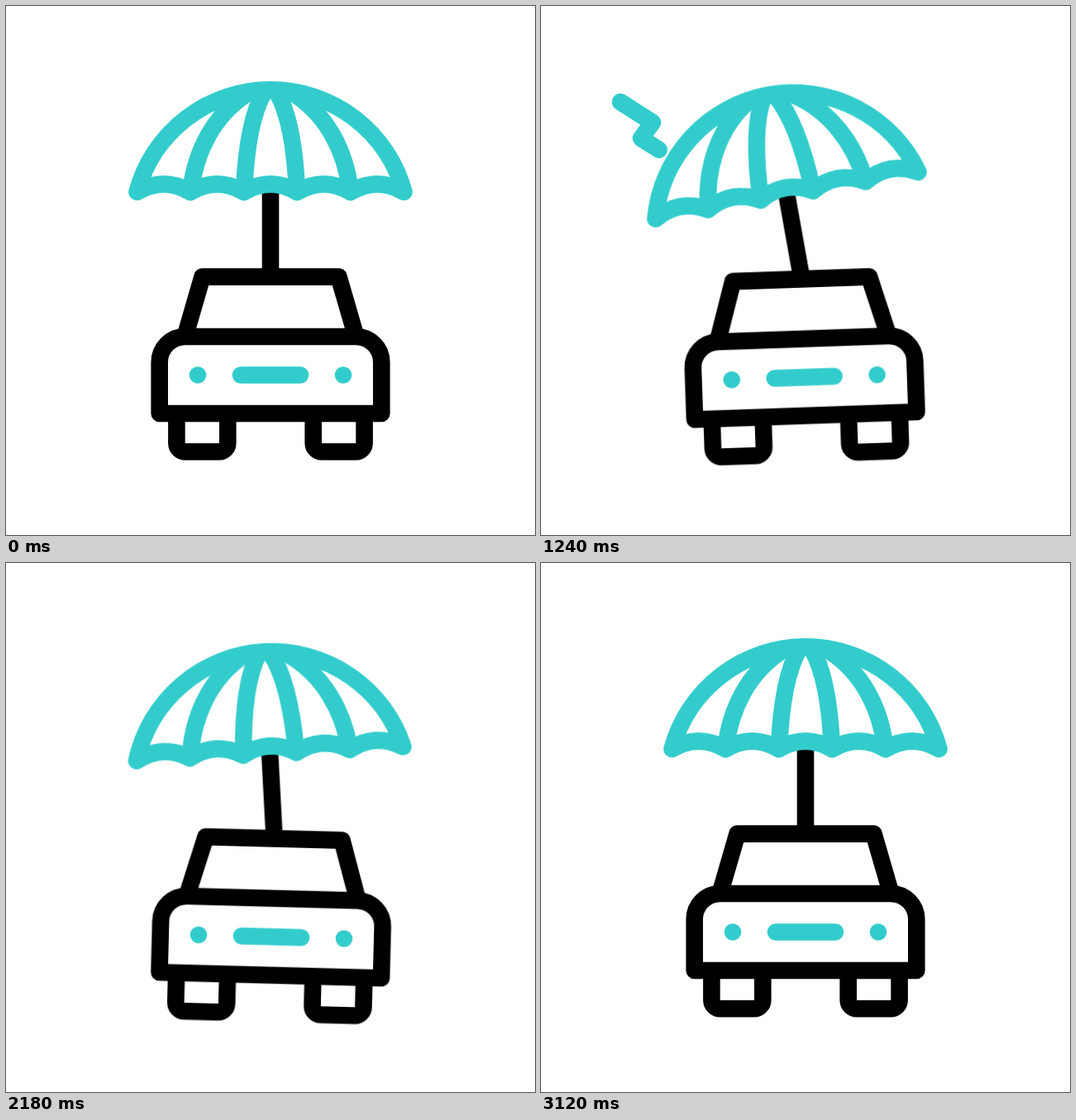
These frames come from a looping animation (640x640 px, 3.6 s). An HTML page:

```html
<!DOCTYPE html>
<html lang="en">
<head>
<meta charset="utf-8">
<title>Sheltered car</title>
<style>
  html, body { margin: 0; width: 100%; height: 100%; overflow: hidden; background: #fff; }
  svg { display: block; width: 100vw; height: 100vh; }
  .line { fill: none; stroke: #000; stroke-width: 20.6; stroke-linecap: round; stroke-linejoin: round; }
  .teal { stroke: #33cccc; }
  .butt { stroke-linecap: butt; }
  .dot { fill: #33cccc; stroke: none; }

  .hop, .sway, .lean {
    transform-box: view-box;
    animation: 3600ms cubic-bezier(.37, 0, .63, 1) infinite;
  }
  .hop { animation-name: hop; }
  .sway { animation-name: sway; transform-origin: 320px 485px; }
  .lean { animation-name: lean; transform-origin: 320px 321px; }

  .bolt, .ray { stroke-dasharray: 1 2; stroke-dashoffset: 1.2; }
  .bolt { animation: strike 3600ms linear infinite backwards; }
  .right { animation-delay: 550ms; }
  .top { animation-delay: 1100ms; }
  .ray { animation: flash 3600ms linear infinite; }

  @keyframes hop {
    0%, 6.11% { transform: translateY(0); }
    13.89% { transform: translateY(-30px); }
    28.06% { transform: translateY(24.5px); }
    35.28% { transform: translateY(2px); }
    49.72% { transform: translateY(24.5px); }
    56.94% { transform: translateY(2px); }
    70.42% { transform: translateY(24px); }
    77.64%, 100% { transform: translateY(0); }
  }
  @keyframes sway {
    0%, 13.89% { transform: rotate(0deg); }
    28.06% { transform: rotate(2.1deg); }
    35.28% { transform: rotate(-2.1deg); }
    49.72% { transform: rotate(0deg); }
    56.94% { transform: rotate(2.1deg); }
    71.39% { transform: rotate(-2deg); }
    78.61%, 100% { transform: rotate(0deg); }
  }
  @keyframes lean {
    0%, 28.06% { transform: rotate(0deg); }
    35.28% { transform: rotate(-8.4deg); }
    49.72% { transform: rotate(15deg); }
    56.94% { transform: rotate(-5.3deg); }
    71.39%, 100% { transform: rotate(0deg); }
  }
  @keyframes strike {
    0%, 30.83% { stroke-dashoffset: 1.2; }
    35.1%, 36.11% { stroke-dashoffset: 0; }
    39.72%, 100% { stroke-dashoffset: -1.2; }
  }
  @keyframes flash {
    0%, 77.78% { stroke-dashoffset: 1.2; }
    81.67%, 82.22% { stroke-dashoffset: 0; }
    85.83%, 100% { stroke-dashoffset: -1.2; }
  }
</style>
</head>
<body>
<svg viewBox="0 0 640 640">
  <defs>
    <path id="zigzag" pathLength="1" d="M96 116L135 141L121 160L160 185"/>
    <path id="spark" pathLength="1" d="M155 140L111 108"/>
    <g id="ribs">
      <path d="M223.3 225C229 175 252 133 289 108"/>
      <path d="M288 225C290 175 297 130 313 103"/>
    </g>
    <path id="wheel" d="M206.4 493V529a10.3 10.3 0 0 0 10.3 10.3H258a10.3 10.3 0 0 0 10.3-10.3V493"/>
  </defs>

  <g class="line teal">
    <use class="bolt" href="#zigzag"/>
    <use class="bolt right" href="#zigzag" transform="rotate(90 320.5 340)"/>
    <use class="bolt top" href="#zigzag" transform="translate(0 20) rotate(45 320.5 340)"/>
    <use class="ray" href="#spark"/>
    <use class="ray" href="#spark" transform="matrix(-1 0 0 1 640 0)"/>
  </g>

  <g class="hop"><g class="sway">
    <g class="lean">
      <path class="line butt" d="M320 218V328"/>
      <g class="line teal">
        <path d="M158.5 225A167.3 167.3 0 0 1 481.5 225q-32.3-19 -64.6 0q-32.3-19 -64.6 0q-32.3-19 -64.6 0q-32.3-19 -64.6 0q-32.3-19 -64.6 0z"/>
        <use href="#ribs"/>
        <use href="#ribs" transform="matrix(-1 0 0 1 640 0)"/>
      </g>
    </g>
    <g class="line butt">
      <path d="M216.5 400L237.5 327.6H402.5L423.5 400"/>
      <use href="#wheel"/>
      <use href="#wheel" transform="matrix(-1 0 0 1 640 0)"/>
      <path d="M185.7 493V431a31 31 0 0 1 31-31H423.3a31 31 0 0 1 31 31V493z"/>
    </g>
    <circle class="dot" cx="232" cy="446.5" r="10.3"/>
    <circle class="dot" cx="408" cy="446.5" r="10.3"/>
    <path class="line teal" d="M284 446.5H356"/>
  </g></g>
</svg>
</body>
</html>
```
